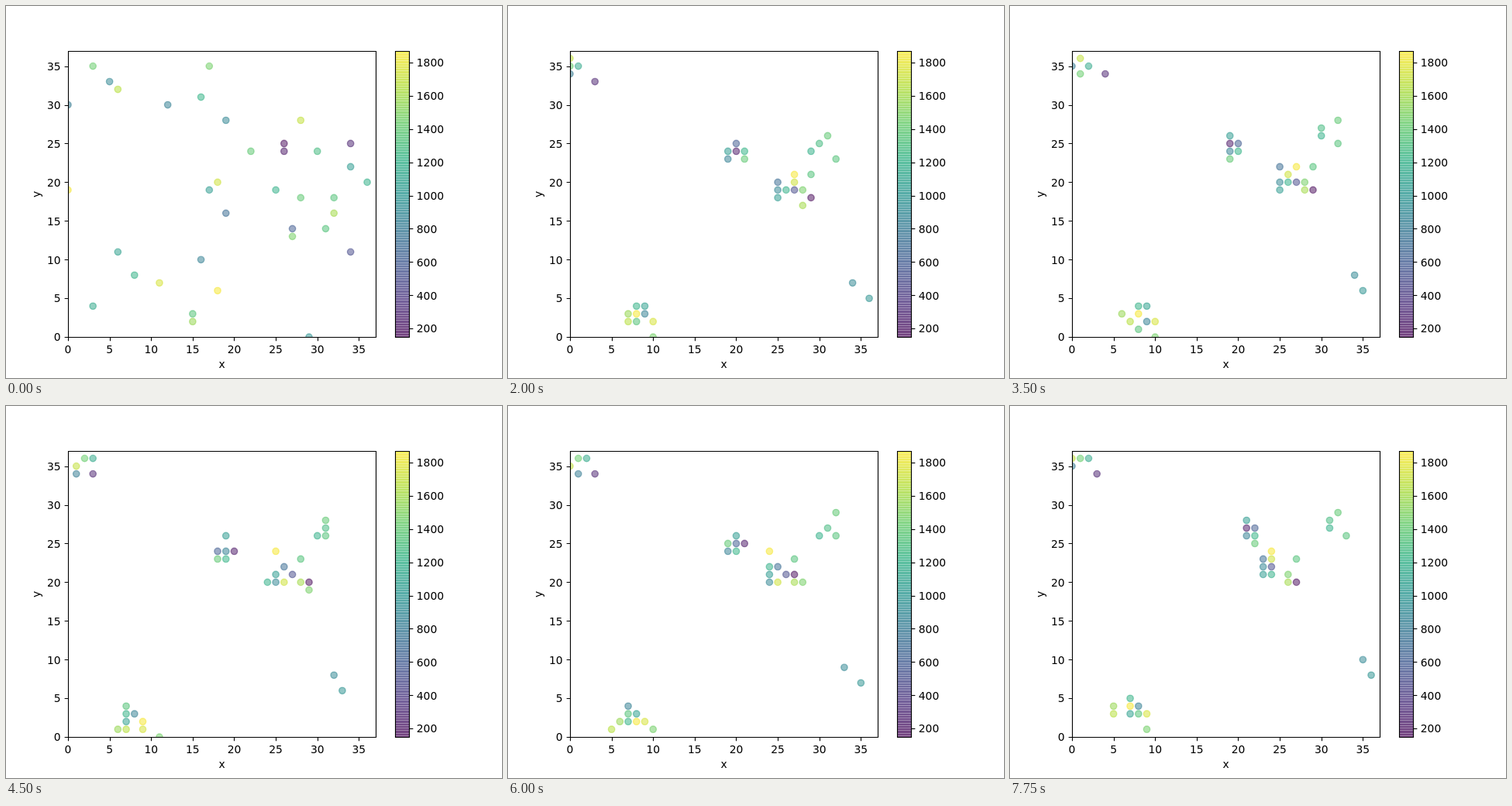
Write an HTML page that moves like this. It is 640 px wide and 480 px high and loops after 8 s.

```html
<!DOCTYPE html>
<html lang="en">
<head>
<meta charset="utf-8">
<title>Agents on a grid</title>
<style>
  html, body { margin: 0; width: 640px; height: 480px; overflow: hidden; background: #fff; }
  svg { display: block; font: 13.89px "DejaVu Sans", sans-serif; }
  .line { fill: none; stroke: #000; stroke-width: 1.11; }
  .dot { fill-opacity: .5; stroke-opacity: .5; stroke-width: 1.39; }
</style>
</head>
<body>
<svg id="plot" width="640" height="480">
  <clipPath id="area"><rect x="80" y="58" width="397" height="369"/></clipPath>
  <g id="dots" clip-path="url(#area)"></g>
</svg>
<script>
const SIZE = 37, STEPS = 32, STEP_MS = 250;
const GATHERED = 5, PHASE = 13;
const MIN_WEALTH = 149, MAX_WEALTH = 1871;
const TOP = 57.6, BOTTOM = 427.2;
const VIRIDIS = ['440154', '472d7b', '3b528b', '2c728e', '21918c', '28ae80', '5ec962', 'addc30', 'fde725']
  .map(hex => [0, 2, 4].map(i => parseInt(hex.slice(i, i + 2), 16)));

// Each crowd drifts along its path while its members mill about
const crowds = [
  { size: 5, poor: 280, rich: 1700, path: [[1, 34], [2, 34.4], [1.5, 35]] },
  { size: 6, poor: 220, rich: 1400, path: [[18.7, 24], [18, 25], [20, 26.5]] },
  { size: 11, poor: 160, rich: 1850, path: [[27, 18.7], [26.7, 21], [24.5, 22]] },
  { size: 4, poor: 1200, rich: 1400, path: [[30.5, 24], [31, 27.5], [31.8, 28]] },
  { size: 9, poor: 850, rich: 1850, path: [[9.5, 3], [9, 2.3], [7.8, 3.5]] },
  { size: 2, poor: 900, rich: 980, path: [[35.5, 5.5], [33.5, 7], [35.7, 8.5]] }
];

const plot = document.getElementById('plot');
const dots = document.getElementById('dots');
const px = x => 80 + x * 396.8 / SIZE;
const py = y => BOTTOM - y * (BOTTOM - TOP) / SIZE;
const snap = v => Math.round(v) + .5;
const mix = (a, b, t) => a + (b - a) * t;
const wrap = v => (v % SIZE + SIZE) % SIZE;
const clamp = (v, high) => Math.max(0, Math.min(high, v));

let seed = 11;
function random() {
  seed = (seed * 16807) % 2147483647;
  return seed / 2147483647;
}

function add(parent, tag, attributes, text = '') {
  const node = document.createElementNS('http://www.w3.org/2000/svg', tag);
  for (const name in attributes) node.setAttribute(name, attributes[name]);
  node.textContent = text;
  return parent.appendChild(node);
}

function label(text, x, y, anchor, extra) {
  add(plot, 'text', { x, y: Math.round(y), 'text-anchor': anchor, ...extra }, text);
}

function line(d) {
  add(plot, 'path', { d, class: 'line' });
}

function colour(share) {
  const place = share * (VIRIDIS.length - 1);
  const i = Math.min(Math.floor(place), VIRIDIS.length - 2);
  return `rgb(${VIRIDIS[i].map((c, k) => Math.round(mix(c, VIRIDIS[i + 1][k], place - i)))})`;
}

const wealthShare = wealth => (wealth - MIN_WEALTH) / (MAX_WEALTH - MIN_WEALTH);

function drawAxes() {
  line('M80.5 58.5H477.5V427.5H80.5Z');
  for (let v = 0; v <= 35; v += 5) {
    line(`M${snap(px(v))} 427.5v4.86M80.5 ${snap(py(v))}h-4.86`);
    label(v, px(v), 448, 'middle');
    label(v, 70.6, py(v) + 5.2, 'end');
  }
  label('x', 278.6, 467, 'middle');
  label('y', 0, 0, 'middle', { transform: 'translate(44 243) rotate(-90)' });
}

// Translucent bands share one pixel row, which leaves fine stripes
function drawColourBar() {
  const band = (BOTTOM - TOP) / 256;
  for (let i = 0; i < 256; i++) {
    const bottom = Math.round(BOTTOM - i * band);
    const y = Math.round(BOTTOM - (i + 1) * band);
    add(plot, 'rect', { x: 502, y, width: 18, height: bottom - y + 1, fill: colour(i / 255), 'fill-opacity': .5 });
  }
  line('M502.5 58.5H520.5V427.5H502.5Z');
  for (let wealth = 200; wealth <= 1800; wealth += 200) {
    const y = BOTTOM - wealthShare(wealth) * (BOTTOM - TOP);
    line(`M520.5 ${snap(y)}h4.86`);
    label(wealth, 529.8, y + 5.2, 'start');
  }
}

function createAgent({ size, poor, rich, path }, rank) {
  const fill = colour(wealthShare(mix(poor, rich, (rank / (size - 1)) ** .7)));
  const angle = random() * 2 * Math.PI;
  const radius = .8 * Math.sqrt(size * random());
  return {
    path,
    start: path[0].map(c => wrap(Math.round(c + 20 * random() - 10))),
    offset: [radius * Math.cos(angle), radius * Math.sin(angle)],
    phase: [random() * 6, random() * 6],
    dot: add(dots, 'circle', { r: 4.17, class: 'dot', fill, stroke: fill })
  };
}

const agents = crowds.flatMap(crowd => Array.from({ length: crowd.size }, (_, rank) => createAgent(crowd, rank)));

// Walks to the crowd by the shorter way round the torus, then stays with it
function cellAt({ path, start, offset, phase }, step) {
  const along = clamp((step - GATHERED) / PHASE, 2);
  const leg = Math.min(Math.floor(along), 1);
  const way = start.map((s, k) => {
    const centre = mix(path[leg][k], path[leg + 1][k], along - leg);
    const goal = clamp(Math.round(centre + offset[k] + .7 * Math.sin(phase[k] + step * 1.1)), SIZE - 1);
    const half = (SIZE - 1) / 2;
    return wrap(goal - s + half) - half;
  });
  const reach = Math.max(1, ...way.map(Math.abs));
  const progress = Math.min(1, step / Math.min(reach, GATHERED + 1));
  return start.map((s, k) => wrap(s + Math.round(way[k] * progress)));
}

// Nearest cell that nobody stands on yet
function freeCell([x, y], taken) {
  for (let ring = 0; ; ring++) {
    for (let dx = -ring; dx <= ring; dx++) {
      for (let dy = -ring; dy <= ring; dy++) {
        const cell = [clamp(x + dx, SIZE - 1), clamp(y + dy, SIZE - 1)];
        if (!taken.has(String(cell))) return cell;
      }
    }
  }
}

function show(step) {
  const taken = new Set();
  for (const agent of agents) {
    const cell = freeCell(cellAt(agent, step), taken);
    taken.add(String(cell));
    agent.dot.setAttribute('cx', px(cell[0]));
    agent.dot.setAttribute('cy', py(cell[1]));
  }
}

let shown = -1;
function tick() {
  const step = Math.floor(performance.now() / STEP_MS) % STEPS;
  if (step !== shown) show(shown = step);
  requestAnimationFrame(tick);
}

drawAxes();
drawColourBar();
tick();
</script>
</body>
</html>
```
